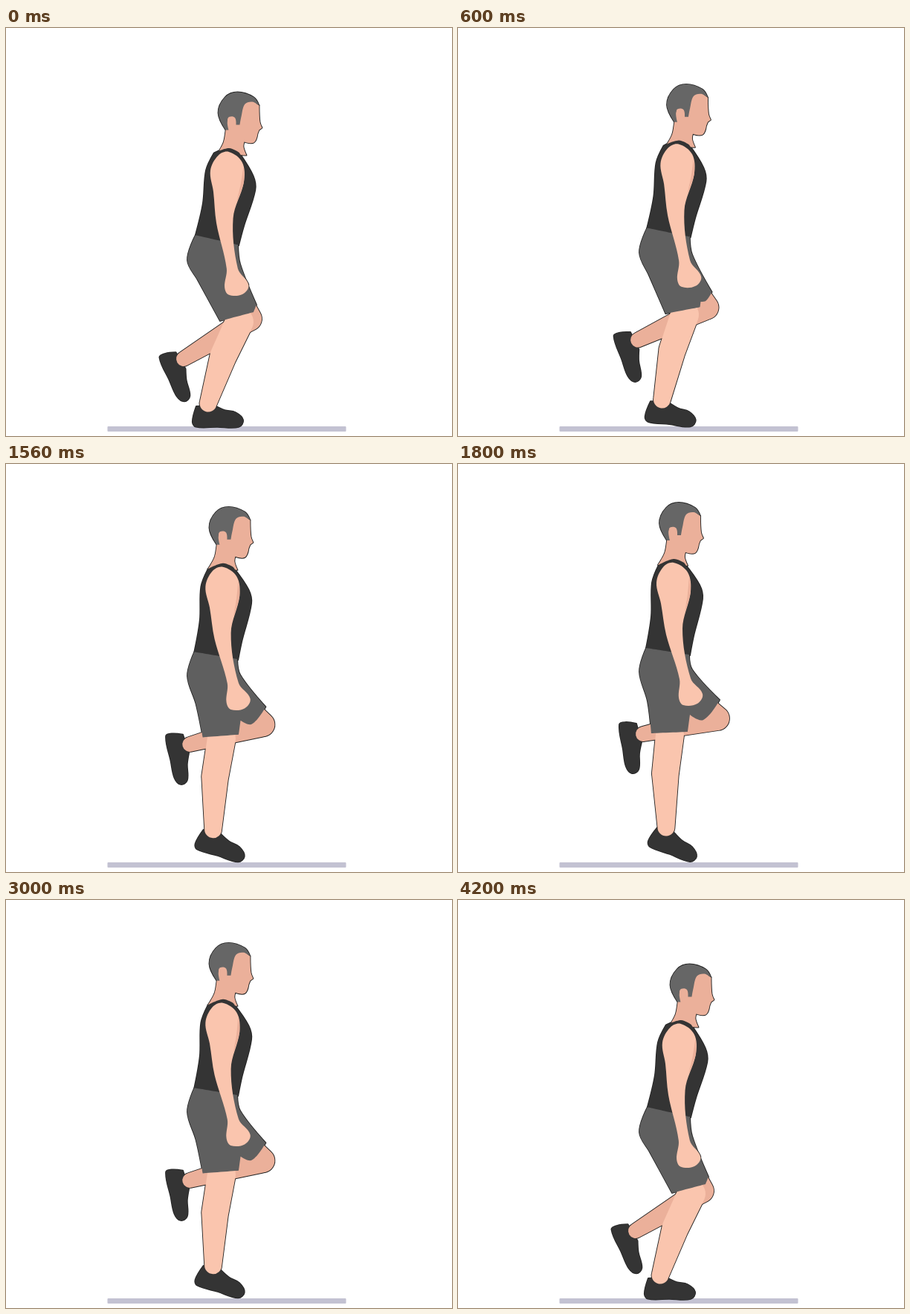
Write an HTML page that moves like this. It is 600 px wide and 550 px high and loops after 4800 ms.

```html
<!DOCTYPE html>
<html lang="en">
<head>
<meta charset="utf-8">
<title>Single-leg calf raise</title>
<style>
  html, body { margin: 0; width: 100%; height: 100%; overflow: hidden; background: #fff; }
  svg { display: block; width: 100%; height: 100%; }
</style>
</head>
<body>
<svg id="stage" viewBox="0 0 600 550">
  <rect x="136.5" y="537" width="321" height="7" rx="1" fill="#c3c2d2"/>
</svg>
<script>
const BEAT = 600, LOOP = 8 * BEAT;
const LIFT = [0, 0.31, 0.83, 1];            // height of each pose, 1 = on tiptoe
const ORDER = [0, 1, 2, 3, 3, 2, 1, 0];     // pose shown on each beat

const SKIN = '#fac5ae', SHADE = '#ebb09a', DARK = '#343434', GREY = '#5f5f5f', HAIR = '#666';

// Joints: x, y with the knee bent, then x, y on tiptoe
const JOINTS = {
  knee: [314, 396, 285, 365],
  ankle: [272, 506, 280, 490],
  farHip: [295, 330, 300, 300],
  farKnee: [328, 392, 349, 343],
  farAnkle: [239, 446, 249, 364],
  seat: [244, 313, 244, 280],
  fold: [258, 340, 255, 320],
  hemBack: [288, 395, 260, 363],
  hemFront: [333, 383, 309, 361],
  notch: [333, 383, 312, 338],
  farHemBack: [335, 378, 330, 345],
  farHemFront: [337, 373, 352, 318],
  lap: [315, 318, 315, 277]
};

// Rigid parts are drawn on tiptoe; shift and turn (degrees) lead to the bent pose
const BODY = { pivot: [290, 130], shift: [10, 34], turn: 4 };
const HEAD = { pivot: [297, 85], shift: [14.5, 34.5], turn: 0 };
const SHOE = { pivot: [312, 536], shift: [1, 2], turn: -20 };
const FAR_SHOE = { pivot: [239, 360], shift: [-9, 87], turn: -15 };

const point = (x, y, sharp = false) => ({ x, y, sharp });

function joint(name, lift) {
  const [x0, y0, x1, y1] = JOINTS[name];
  return point(x0 + (x1 - x0) * lift, y0 + (y1 - y0) * lift);
}

// "x,y" pairs moved with a rigid part; "!" marks a sharp corner
function place(text, { pivot, shift, turn }, lift) {
  const back = 1 - lift, angle = turn * back * Math.PI / 180;
  const cos = Math.cos(angle), sin = Math.sin(angle);
  return text.split(' ').map(word => {
    const [x, y] = word.split(',').map((v, i) => parseFloat(v) - pivot[i]);
    return point(
      pivot[0] + shift[0] * back + x * cos - y * sin,
      pivot[1] + shift[1] * back + x * sin + y * cos,
      word.endsWith('!'));
  });
}

// Closed smooth curve through the points
function curve(points) {
  const n = points.length;
  const at = i => points[(i + n) % n];
  const handle = (i, reach) => {
    const p = at(i), a = at(i - 1), b = at(i + 1);
    const k = p.sharp ? 0 : reach / (Math.hypot(b.x - a.x, b.y - a.y) || 1);
    return `${p.x + (b.x - a.x) * k} ${p.y + (b.y - a.y) * k}`;
  };
  let d = `M${points[0].x} ${points[0].y}`;
  for (let i = 0; i < n; i++) {
    const p = at(i), q = at(i + 1);
    const reach = Math.hypot(q.x - p.x, q.y - p.y) / 3;
    d += `C${handle(i, reach)} ${handle(i + 1, -reach)} ${q.x} ${q.y}`;
  }
  return d + 'Z';
}

// Tapered limb section with round ends
function limb(a, b, ra, rb) {
  const len = Math.hypot(b.x - a.x, b.y - a.y);
  const nx = (b.y - a.y) / len, ny = (a.x - b.x) / len;
  const side = (p, r) => `${p.x + nx * r} ${p.y + ny * r}`;
  return `M${side(a, ra)}L${side(b, rb)}A${rb} ${rb} 0 0 1 ${side(b, -rb)}`
    + `L${side(a, -ra)}A${ra} ${ra} 0 0 1 ${side(a, ra)}Z`;
}

function farLeg(lift) {
  const [hip, knee, ankle] = ['farHip', 'farKnee', 'farAnkle'].map(name => joint(name, lift));
  return limb(hip, knee, 15, 16) + limb(knee, ankle, 16, 10);
}

function nearLeg(lift) {
  const knee = joint('knee', lift), ankle = joint('ankle', lift);
  const calf = point(knee.x + (ankle.x - knee.x) * 0.42 - 4, knee.y + (ankle.y - knee.y) * 0.42);
  return limb(knee, calf, 19, 18) + limb(calf, ankle, 18, 11.5);
}

function shorts(lift) {
  const [back, front] = place('253,248! 311,257!', BODY, lift);
  const corner = name => ({ ...joint(name, lift), sharp: true });
  return curve([
    back, joint('seat', lift), joint('fold', lift), corner('hemBack'), corner('hemFront'),
    corner('notch'), joint('farHemBack', lift), corner('farHemFront'), joint('lap', lift), front
  ]);
}

const rigid = (text, part) => lift => curve(place(text, part, lift));

// Back to front
const LAYERS = [
  [DARK, rigid('240,350! 226,348 217,351 222,385 226,408 234,417 243,412 244,390 247,375!', FAR_SHOE)],
  [SHADE, farLeg],
  [DARK, rigid('268,490! 256,508 258,516 285,526 312,536 321,529 315,516 302,508 291,497!', SHOE)],
  [SKIN, nearLeg],
  // face and neck, hair
  [SHADE, rigid('285,78! 281,104 278,120 269,136! 309,137! 305,126 306,119! 319,120 324,108! 326,103! 330,100! 327,92 326,70! 310,58!', HEAD)],
  [HAIR, rigid('281,103! 271,80 280,59 297,52 319,59 326,70! 317,65 307,68 302,85 300,96! 295,96! 293,86 284,87 285,103!', HEAD)],
  // vest
  [DARK, rigid('270,136! 290,128 304,133! 325,163 329,182 317,232 312,258! 283,257 253,248! 260,205 261,160', BODY)],
  [GREY, shorts],
  // arm and its shaded edge
  [SKIN, rigid('290,133 276,139 267,160 273,188 280,230 298,290 297,315 303,325 322,323 329,310 313,289 302,222 313,172 309,146', BODY)],
  [SHADE, rigid('311,152! 313,172 305,200! 309,175', BODY)]
];

function add(parent, name, attrs = {}) {
  const el = document.createElementNS('http://www.w3.org/2000/svg', name);
  for (const key in attrs) el.setAttribute(key, attrs[key]);
  return parent.appendChild(el);
}

const stage = document.getElementById('stage');
const RIM = { fill: 'none', stroke: '#222', 'stroke-width': 1.8, 'stroke-linejoin': 'round' };

LIFT.forEach((lift, pose) => {
  const group = add(stage, 'g');
  const shapes = LAYERS.map(([fill, draw]) => ({ fill, d: draw(lift) }));
  shapes.forEach(({ d }) => add(group, 'path', { ...RIM, d }));
  shapes.forEach(shape => add(group, 'path', shape));

  const frames = [...ORDER, ORDER[0]].map((shown, beat) => ({
    offset: beat * BEAT / LOOP,
    opacity: shown === pose ? 1 : 0,
    easing: 'steps(1, end)'
  }));
  group.animate(frames, { duration: LOOP, iterations: Infinity });
});
</script>
</body>
</html>
```
